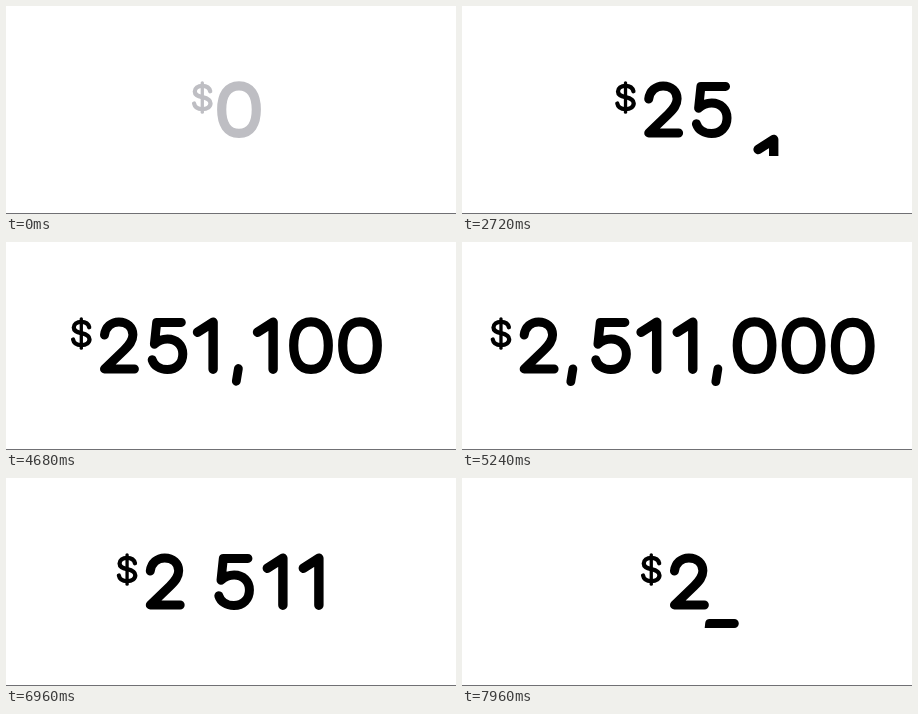
An HTML page with a canvas that plays this animation: 450 px wide and 208 px high, repeating every 8 s.

```html
<!DOCTYPE html>
<html lang="en">
<head>
<meta charset="utf-8">
<title>Amount entry</title>
<style>
  html, body { margin: 0; width: 100%; height: 100%; overflow: hidden; background: #fff; }
  canvas { display: block; width: 450px; height: 208px; }
</style>
</head>
<body>
<canvas id="stage" width="450" height="208" role="img" aria-label="$0"></canvas>
<script>
const canvas = document.getElementById('stage');
const ctx = canvas.getContext('2d');
const ratio = window.devicePixelRatio || 1;
canvas.width = 450 * ratio;
canvas.height = 208 * ratio;

const LOOP = 8000, TICK = 40, MOVE = 240;
const CENTER = 221.75, CLIP = 150;
const RISE = 104, FALL = 94, COMMA_SHIFT = 80, SLIDE = 50;
const GREY = 190;

// Rounded figures as pen strokes: advance width, then [pen width, path] pairs.
const glyphs = {
  '$': [22.5, [4.3, 'M18.2 85.2C17.4 81.8 14.3 79.8 10.3 79.8C5.9 79.8 2.8 82.2 2.8 85.5C2.8 88.9 5.5 90 10.3 91.1C15.3 92.2 18.5 93.7 18.5 97.3C18.5 100.8 15.3 103.1 10.3 103.1C5.8 103.1 2.7 100.9 2.1 97.5'],
              [3.3, 'M10.3 76.8V106.2']],
  '0': [49, [9.2, 'M24.5 79.8C36.3 79.8 41.8 89.4 41.8 103.6S36.3 127.4 24.5 127.4S7.2 117.8 7.2 103.6S12.7 79.8 24.5 79.8Z']],
  '1': [36, [9.4, 'M7 90.3L22.6 80.2V127.2']],
  '2': [48, [9, 'M11 93C12 85 18 79.9 25.4 79.9C33.6 79.9 39.4 85.2 39.4 92.8C39.4 98.8 36 102.8 30.5 108.2L11 127H40.9']],
  '5': [49, [9, 'M39.8 80.4H15.2L12.9 102.2C16.8 98.6 21.3 97 26 97C35 97 41.3 103.3 41.3 111.9C41.3 121.2 34.8 127.5 25.8 127.5C18.3 127.5 12.5 123.6 10.7 117.8']],
  ',': [24, [8.8, 'M11.9 126.5L9.8 139.3']]
};
for (const [, ...strokes] of Object.values(glyphs))
  for (const stroke of strokes) stroke[1] = new Path2D(stroke[1]);

// at: first visible change, lead: how far the move has run by then.
const steps = [
  { at: 1480, lead: 48, to: '2' },
  { at: 1960, lead: 52, to: '25' },
  { at: 2720, lead: 48, to: '251' },
  { at: 3240, lead: 48, to: '2511' },
  { at: 3920, lead: 48, to: '25110' },
  { at: 4520, lead: 110, to: '251100' },
  { at: 5120, lead: 79, to: '2511000' },
  { at: 6360, lead: 81, to: '251100' },
  { at: 6640, lead: 60, to: '25110' },
  { at: 6920, lead: 78, to: '2511', commaLag: 50 },
  { at: 7200, lead: 80, to: '251' },
  { at: 7560, lead: 78, to: '25' },
  { at: 7960, lead: 78, to: '2' }
];

// Places every character of an amount, keyed so that it can be followed.
function layout(digits) {
  const items = [['$', '$']];
  [...digits].forEach((ch, i) => {
    if (i && (digits.length - i) % 3 === 0) items.push([',' + i, ',']);
    items.push([i + ch, ch]);
  });
  const width = items.reduce((sum, [, ch]) => sum + glyphs[ch][0], 0);
  let x = CENTER - width / 2;
  const places = new Map();
  for (const [key, ch] of items) {
    places.set(key, { ch, x });
    x += glyphs[ch][0];
  }
  return places;
}

let last = '0';
for (const step of steps) {
  step.before = layout(last);
  step.after = layout(step.to);
  step.swap = last === '0';
  last = step.to;
}
const start = layout('0');

const ease = ms => 1 - (1 - Math.min(1, Math.max(0, ms / MOVE))) ** 3;

function drawGlyph(ch, x, y, alpha, grey) {
  ctx.save();
  ctx.translate(x, y);
  ctx.globalAlpha = alpha;
  ctx.strokeStyle = `rgb(${grey},${grey},${grey * 1.026})`;
  for (const [pen, path] of glyphs[ch].slice(1)) {
    ctx.lineWidth = pen;
    ctx.stroke(path);
  }
  ctx.restore();
}

function drawMove(step, time) {
  const ms = time - step.at + step.lead;
  const p = ease(ms), rest = 1 - p;
  const commaRest = 1 - ease(ms - (step.commaLag || 0));
  const { before, after, swap } = step;

  for (const [key, { ch, x }] of before) {
    if (after.has(key) || p === 1) continue;
    if (swap) drawGlyph(ch, x, 0, rest, GREY);
    else drawGlyph(ch, x, p * (ch === ',' ? COMMA_SHIFT : FALL), 1, 0);
  }
  for (const [key, { ch, x }] of after) {
    const old = before.get(key);
    if (old) drawGlyph(ch, x + (old.x - x) * rest, 0, 1, swap ? GREY * rest : 0);
    else if (swap) drawGlyph(ch, x, 24 * rest, p, 0);
    else if (ch === ',') drawGlyph(ch, x, COMMA_SHIFT * commaRest, 1, 0);
    else drawGlyph(ch, x + SLIDE * rest, RISE * rest, 1, 0);
  }
}

function render(now) {
  const time = Math.floor((now % LOOP) / TICK) * TICK;
  ctx.setTransform(ratio, 0, 0, ratio, 0, 0);
  ctx.fillStyle = '#fff';
  ctx.fillRect(0, 0, 450, 208);
  ctx.fillStyle = '#707074';
  ctx.fillRect(0, 207, 450, 1);

  ctx.save();
  ctx.beginPath();
  ctx.rect(0, 0, 450, CLIP);
  ctx.clip();
  ctx.lineCap = ctx.lineJoin = 'round';
  const step = steps.filter(s => s.at <= time).pop();
  if (step) drawMove(step, time);
  else for (const { ch, x } of start.values()) drawGlyph(ch, x, 0, 1, GREY);
  ctx.restore();

  const label = '$' + Number(step ? step.to : 0).toLocaleString('en-US');
  if (canvas.getAttribute('aria-label') !== label) canvas.setAttribute('aria-label', label);
}

const origin = performance.now();
function frame() {
  render(performance.now() - origin);
  requestAnimationFrame(frame);
}
frame();
</script>
</body>
</html>
```
